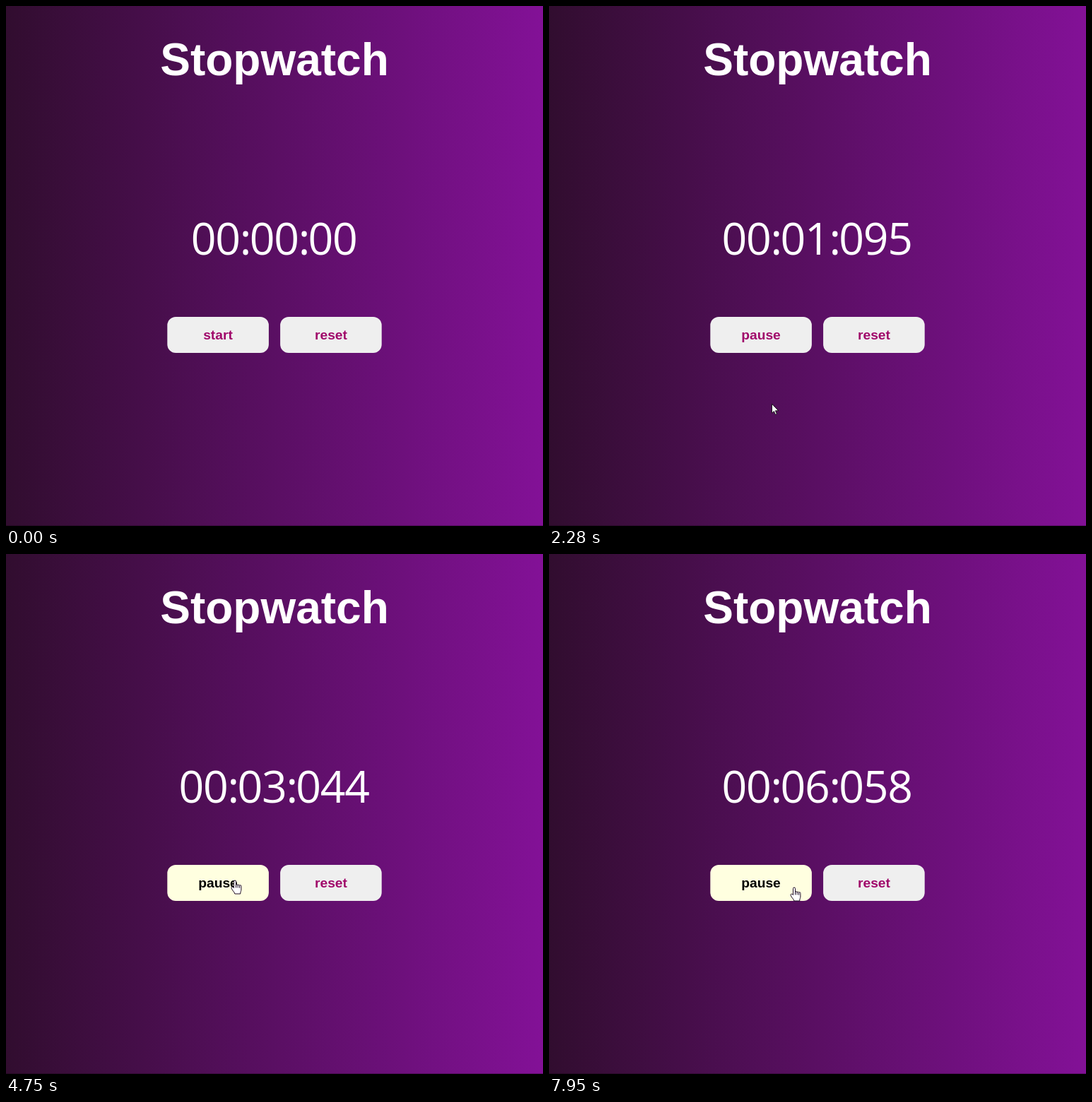
Animation, 760 px wide and 736 px high, one loop 8000 ms. Source, as an HTML page:

```html
<!DOCTYPE html>
<html lang="en">
<head>
<meta charset="utf-8">
<title>Stopwatch</title>
<style>
  html, body { margin: 0; width: 100%; height: 100%; overflow: hidden; background: #310d2f; }
  svg { display: block; width: 100%; height: 100%; }
  .title { font: bold 64px "Liberation Sans", Arial, sans-serif; fill: #fff; text-anchor: middle; }
  .time { font: 62.5px "Open Sans", "Noto Sans", sans-serif; fill: #fff; }
  .label { font: bold 19.2px "Liberation Sans", Arial, sans-serif; text-anchor: middle; }
</style>
</head>
<body>
<svg viewBox="0 0 760 736">
  <defs>
    <linearGradient id="bg">
      <stop offset="0" stop-color="#310d2f"/>
      <stop offset="1" stop-color="#831197"/>
    </linearGradient>
  </defs>
  <rect width="760" height="736" fill="url(#bg)"/>
  <rect y="735" width="760" height="1" opacity=".3"/>
  <text class="title" x="380" y="98">Stopwatch</text>
  <text class="time" id="time" y="352.3"></text>
  <g id="start">
    <rect x="228.3" y="440" width="143.6" height="51" rx="12"/>
    <text class="label" x="300" y="472"></text>
  </g>
  <g id="reset">
    <rect x="388.1" y="440" width="143.6" height="51" rx="12"/>
    <text class="label" x="460" y="472"></text>
  </g>
  <g id="cursor" stroke-linejoin="round" stroke-linecap="round">
    <path id="arrow" d="M.5.5V13.2L3.4 10.5 5.4 15.3 7.4 14.4 5.4 9.8H9.4Z" fill="#fff" stroke="#111" stroke-width=".9"/>
    <g id="hand" fill="#fff" stroke="#1c0a22">
      <path d="M-1.5 10.2V1.5a1.5 1.5 0 0 1 3 0V7a1.3 1.3 0 0 1 2.6 0a1.3 1.3 0 0 1 2.5.6a1.2 1.2 0 0 1 2.3.8V13c0 2-1.2 3-1.2 6H-.2c0-2.5-4.3-5-4.8-8.5-.2-1.5 2-1.9 3.5-.3z"/>
      <path d="M1.5 7v3M4.1 7.3v2.7M6.6 8v2.3" fill="none"/>
    </g>
  </g>
</svg>
<script>
const LOOP = 8000, FIRST = 460, STEP = 66.87, FADE = 200;
const RUN = 1316, PAUSE = 6485, RESUME = 7565, RATE = 1.005;
const $ = id => document.getElementById(id);

// pointer moves: begin, end, then the point reached
const entry = [673, 718];
const moves = [
  [460, 1130, 318, 459],
  [1700, 2140, 313, 565],
  [2140, 2810, 330, 543],
  [2810, 3450, 324, 462],
  [4950, 5900, 422, 459],
  [5900, 6380, 346, 466],
  [6380, 6800, 363, 540],
  [6800, 7520, 347, 472]
];
const left = { start: 228, reset: 388 };

const clamp = v => Math.max(0, Math.min(1, v));
const ease = p => p * p * (3 - 2 * p);
const lerp = (a, b, p) => a + (b - a) * p;
const mix = (a, b, p) => `rgb(${a.map((v, i) => Math.round(lerp(v, b[i], p)))})`;

function pointerAt(t) {
  return moves.reduce(([px, py], [begin, end, x, y]) => {
    const p = ease(clamp((t - begin) / (end - begin)));
    return [lerp(px, x, p), lerp(py, y, p)];
  }, entry);
}

function isOver(id, t) {
  const [x, y] = pointerAt(t);
  return x >= left[id] && x < left[id] + 144 && y >= 440 && y < 491;
}

// share of the last FADE ms spent over the button
function hoverLevel(id, t) {
  const samples = 20;
  let hits = 0;
  for (let i = 0; i < samples; i++) hits += isOver(id, t - i * FADE / samples);
  return ease(hits / samples);
}

function clockText(t) {
  if (t < RUN) return "00:00:00";
  const ms = RATE * (Math.min(t, PAUSE) - RUN + Math.max(0, t - RESUME));
  const cs = Math.floor(ms / 10);
  const pad = (n, len) => String(n).padStart(len, "0");
  return `00:${pad(Math.round(cs / 100), 2)}:${pad(cs % 100, 3)}`;
}

function drawClock(str) {
  const widths = [...str].map(c => c === ":" ? 13.9 : 34.5);
  let x = 379.2 - widths.reduce((a, b) => a + b) / 2;
  const xs = widths.map(w => (x += w) - w);
  $("time").setAttribute("x", xs.map(v => v.toFixed(2)).join(" "));
  $("time").textContent = str;
}

function drawButton(id, label, t) {
  const [box, text] = $(id).children, p = hoverLevel(id, t);
  box.setAttribute("fill", mix([239, 239, 239], [255, 255, 224], p));
  text.setAttribute("fill", mix([160, 8, 106], [0, 0, 0], p));
  text.textContent = label;
}

function drawCursor(t) {
  const over = isOver("start", t) || isOver("reset", t);
  const [x, y] = pointerAt(t).map(Math.round);
  $("cursor").setAttribute("transform", `translate(${x} ${y})`);
  $("cursor").setAttribute("visibility", t < FIRST ? "hidden" : "visible");
  $("hand").setAttribute("display", over ? "inline" : "none");
  $("arrow").setAttribute("display", over ? "none" : "inline");
}

function draw(time) {
  const k = Math.floor((time - FIRST) / STEP + 0.05);
  const t = k < 0 ? 0 : Math.ceil((FIRST + k * STEP) / 10) * 10;
  const running = (t >= RUN && t < PAUSE) || t >= RESUME;
  drawClock(clockText(t));
  drawButton("start", running ? "pause" : "start", t);
  drawButton("reset", "reset", t);
  drawCursor(t);
}

const origin = performance.now();
function tick() {
  draw((performance.now() - origin) % LOOP);
  requestAnimationFrame(tick);
}
tick();
</script>
</body>
</html>
```
